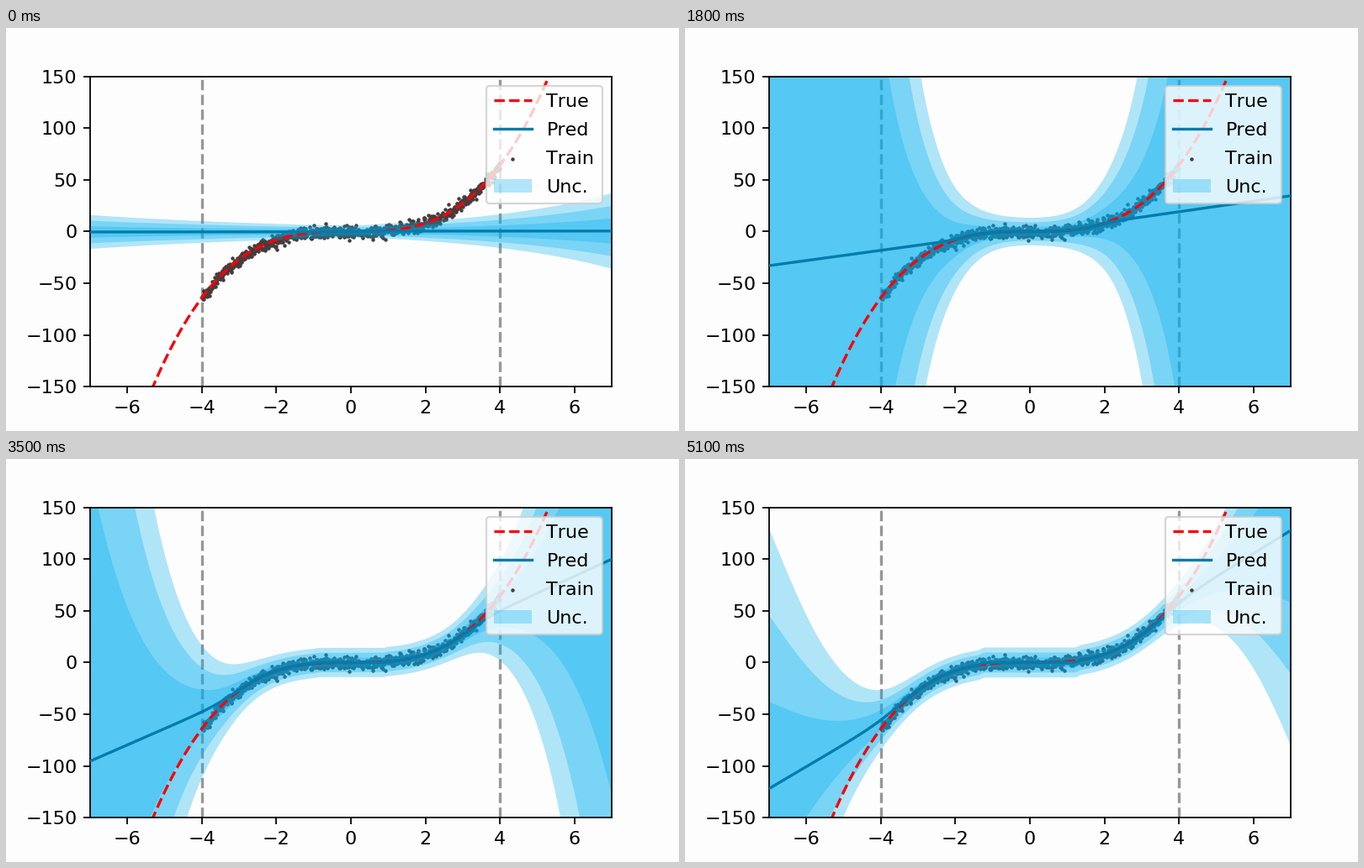
Recreate the animation shown at these times as a matplotlib script. Size 800 by 480 pixels, loop 6.1 s.

```python
import numpy as np
import matplotlib.pyplot as plt
from matplotlib.animation import FuncAnimation

TICK = 100      # ms per step
TICKS = 61
HOLD = 4        # extra ticks on the first state
STEPS = 48      # training states; the last one stays to the end

plt.rcParams["text.kerning_factor"] = 6

x = np.linspace(-7, 7, 1000)
u = np.abs(x)
side = np.sign(x)


def smoothstep(s):
    return s * s * (3 - 2 * s)


def prediction(t):
    """Cubic near the middle, turning into straight tails outside."""
    line = (21.7 + 0.5 * side) * t * (u - 1.25 * t)
    line = 0.5 * np.logaddexp(0, 2 * line)
    cube = u ** 3
    p = 8
    return side * cube * line / (cube ** p + line ** p + 1e-30) ** (1 / p)


def half_width(t, fade):
    """Flat up to a knee that moves outward, then growing exponentially."""
    k = 0.42
    knee = 0.3 + (3.4 + 0.2 * side) * t
    g = k * np.log1p(2 * np.exp(-knee / k) * (np.cosh(u / k) - 1))
    gain = (1.2 + 0.3 * (1 - t) ** 3) * (1 - fade * (0.86 - 0.04 * side))
    log_rise = gain * g - 0.11 * t ** 2 * g ** 2
    return (13 + 1.5 * t - 7 * fade) * np.exp(np.minimum(log_rise, 6))


def state(step):
    t = smoothstep((step + 1) / STEPS)
    fade = np.exp(-step / 1.5)      # the untrained start dies out quickly
    return prediction(t), half_width(t, fade)


def ribbon(mu, half):
    return [np.column_stack([np.r_[x, x[::-1]],
                             np.r_[mu - half, (mu + half)[::-1]]])]


fig, ax = plt.subplots(figsize=(5, 3), dpi=160, facecolor="#fdfdfd")
ax.set_facecolor("#fdfdfd")

rng = np.random.default_rng(7)
xt = np.linspace(-4, 4, 1000)
yt = xt ** 3 + rng.normal(0, 3, xt.size)
train = ax.scatter(xt, yt, s=1, c="#463c3c", zorder=0, label="Train")
for edge in (-4, 4):
    ax.plot([edge, edge], [-150, 150], "k--", alpha=0.4, zorder=0)

mu0, half0 = state(0)
bands = [ax.fill_between(x, mu0 - half0 * n / 3, mu0 + half0 * n / 3,
                         alpha=0.3, facecolor="#00aeef", linewidth=0,
                         zorder=1, label="Unc.") for n in (1, 2, 3)]
true, = ax.plot(x, x ** 3, "--", color="#f4040a", zorder=2, label="True")
pred, = ax.plot(x, mu0, color="#007cab", zorder=3, label="Pred")

ax.set_xlim(-7, 7)
ax.set_ylim(-150, 150)
ax.legend(handles=[true, pred, train, bands[-1]], loc="upper right",
          labelspacing=0.62, borderpad=0.43)


def update(tick):
    mu, half = state(np.clip(tick - HOLD, 0, STEPS - 1))
    pred.set_ydata(mu)
    for n, band in enumerate(bands, 1):
        band.set_verts(ribbon(mu, half * n / 3))
    return [pred, *bands]


anim = FuncAnimation(fig, update, frames=TICKS, interval=TICK,
                     repeat=True, repeat_delay=0, blit=False)
plt.show()
```
